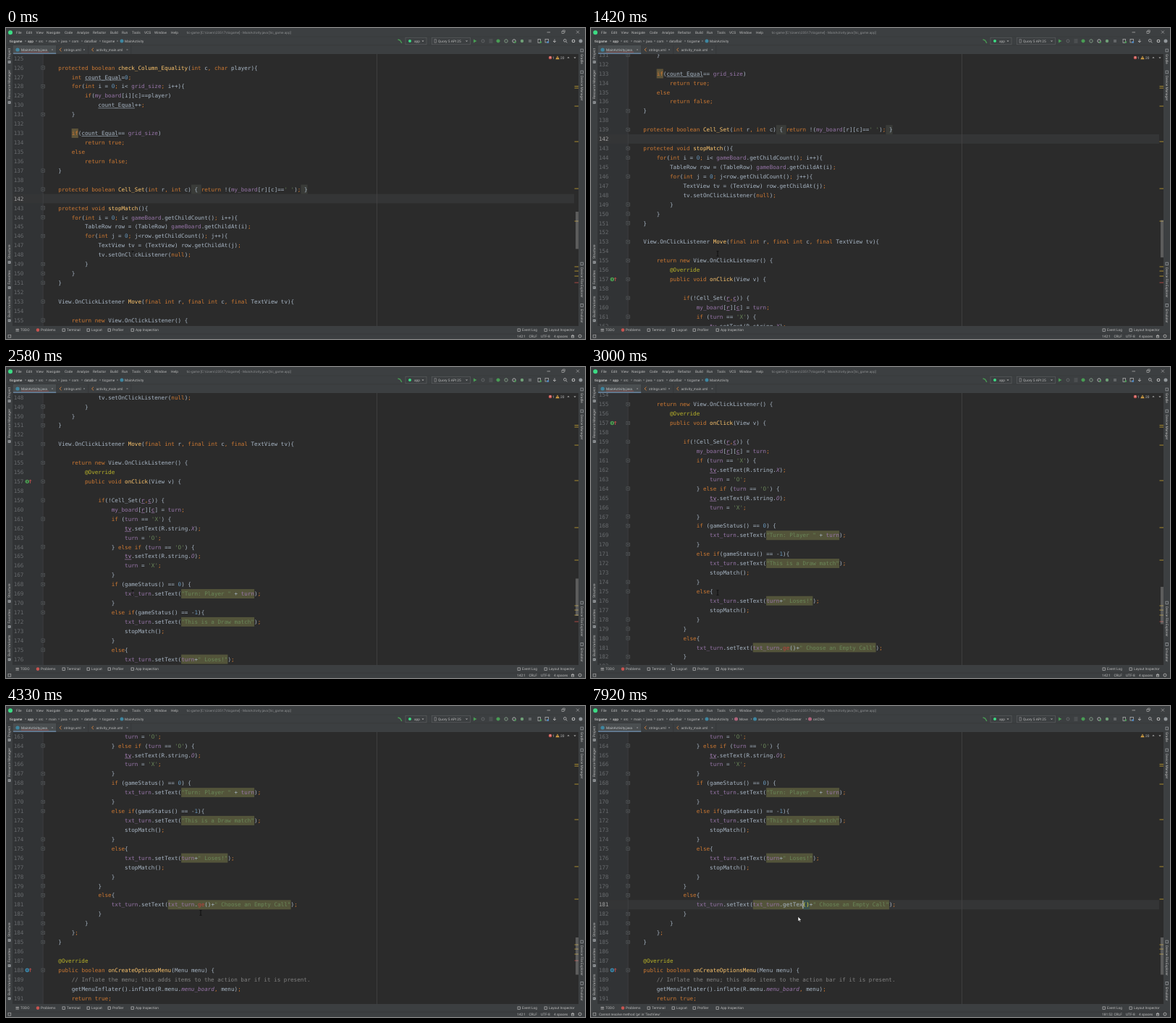
An HTML page with a canvas that plays this animation: 800 px wide and 430 px high, repeating every 8000 ms.

```html
<!DOCTYPE html>
<html lang="en">
<head>
<meta charset="utf-8">
<title>Code editor</title>
<style>
html, body { margin: 0; width: 100%; height: 100%; overflow: hidden; background: #2b2b2b; }
canvas { display: block; }
</style>
</head>
<body>
<canvas id="stage" width="800" height="430"></canvas>
<script>
const ctx = document.getElementById('stage').getContext('2d');
ctx.textRendering = 'geometricPrecision';

const LOOP = 8000, STEP = 1000 / 12;
const CODE_X = 72.3, CHAR = 4.59, ROW = 12.93, FIRST_Y = 42;
const MONO = '7.62px "DejaVu Sans Mono", monospace';
const UI = '4.8px Roboto, sans-serif';
const PANEL = '#3c3f41', INK = '#bbbbbb', DIM = '#8c8e90', GREEN = '#499c54';
const ORANGE = '#cc7832', PURPLE = '#9876aa', PLAIN = '#a9b7c6', YELLOW = '#c4a33a', BLUE = '#4a88c7', RED = '#c75450';

const CLICK = 4830, ANALYSED = 7170;
const KEYS = [[6580, 't'], [7670, 'T'], [7750, 'e'], [7910, 'x']];
const SCROLL = [[833, 0], [1417, 82.5], [2083, 185], [2583, 271.5], [3333, 417], [3583, 426.7], [3667, 426.7], [4000, 465.5]];
const MOUSE_X = [[3900, 175], [4330, 269], [4420, 269], [4667, 275], [4920, 275], [5500, 286]];
const MOUSE_Y = [[3900, 312], [4330, 286], [4420, 286], [4667, 280], [4920, 280], [5500, 291]];

const SOURCE = `
protected boolean check_Column_Equality(int c, char player){
    int count_Equal=0;
    for(int i = 0; i< grid_size; i++){
        if(my_board[i][c]==player)
            count_Equal++;
    }

    if(count_Equal== grid_size)
        return true;
    else
        return false;
}

protected boolean Cell_Set(int r, int c) { return !(my_board[r][c]==' '); }

protected void stopMatch(){
    for(int i = 0; i< gameBoard.getChildCount(); i++){
        TableRow row = (TableRow) gameBoard.getChildAt(i);
        for(int j = 0; j<row.getChildCount(); j++){
            TextView tv = (TextView) row.getChildAt(j);
            tv.setOnClickListener(null);
        }
    }
}

View.OnClickListener Move(final int r, final int c, final TextView tv){

    return new View.OnClickListener() {
        @Override
        public void onClick(View v) {

            if(!Cell_Set(r,c)) {
                my_board[r][c] = turn;
                if (turn == 'X') {
                    tv.setText(R.string.X);
                    turn = 'O';
                } else if (turn == 'O') {
                    tv.setText(R.string.O);
                    turn = 'X';
                }
                if (gameStatus() == 0) {
                    txt_turn.setText("Turn: Player " + turn);
                }
                else if(gameStatus() == -1){
                    txt_turn.setText("This is a Draw match");
                    stopMatch();
                }
                else{
                    txt_turn.setText(turn+" Loses!");
                    stopMatch();
                }
            }
            else{
                txt_turn.setText(txt_turn.ge()+" Choose an Empty Call");
            }
        }
    };
}

@Override
public boolean onCreateOptionsMenu(Menu menu) {
    // Inflate the menu; this adds items to the action bar if it is present.
    getMenuInflater().inflate(R.menu.menu_board, menu);
    return true;`.split('\n');

const TOKEN = /\/\/.*|"[^"]*"|'[^']*'|@?\w+|\s+|[^\w\s]/g;
const KEYWORD = /^(protected|public|final|boolean|int|char|void|for|if|else|return|true|false|null|new)$/;
const FIELD = /^(my_board|gameBoard|turn|grid_size|txt_turn)$/;

// The folded body hides two line numbers.
const lineNumber = row => row < 15 ? 125 + row : 127 + row;
const column = n => CODE_X + n * CHAR;

function track(keys, t) {
  if (t <= keys[0][0]) return keys[0][1];
  for (let i = 1; i < keys.length; i++) {
    const [a, from] = keys[i - 1], [b, to] = keys[i];
    if (t <= b) return from + (to - from) * (t - a) / (b - a);
  }
  return keys[keys.length - 1][1];
}

function box(x, y, w, h, color) {
  ctx.fillStyle = color;
  ctx.fillRect(x, y, w, h);
}
function frame(x, y, w, h, color, width = 0.7) {
  ctx.strokeStyle = color;
  ctx.lineWidth = width;
  ctx.strokeRect(x, y, w, h);
}
function dot(x, y, r, color) {
  ctx.fillStyle = color;
  ctx.beginPath();
  ctx.arc(x, y, r, 0, 7);
  ctx.fill();
}
function ring(x, y, r, color, width = 0.8) {
  ctx.strokeStyle = color;
  ctx.lineWidth = width;
  ctx.beginPath();
  ctx.arc(x, y, r, 0, 7);
  ctx.stroke();
}
function path(points, stroke, width = 0.8, fill) {
  ctx.beginPath();
  points.forEach(([x, y], i) => i ? ctx.lineTo(x, y) : ctx.moveTo(x, y));
  if (fill) { ctx.closePath(); ctx.fillStyle = fill; ctx.fill(); }
  if (stroke) { ctx.strokeStyle = stroke; ctx.lineWidth = width; ctx.stroke(); }
}
function label(text, x, y, color = INK, font = UI) {
  ctx.font = font;
  ctx.fillStyle = color;
  ctx.fillText(text, x, y + 1.7);
}
function sideLabel(text, x, y, angle) {
  ctx.save();
  ctx.translate(x, y);
  ctx.rotate(angle);
  label(text, 0, 0);
  ctx.restore();
}
function chevron(x, y, dx, dy, color = DIM) {
  path([[x - dx - dy, y - dy - dx], [x + dx, y + dy], [x - dx + dy, y - dy + dx]], color, 0.7);
}
function cross(x, y, r, color) {
  path([[x - r, y - r], [x + r, y + r]], color, 0.6);
  path([[x + r, y - r], [x - r, y + r]], color, 0.6);
}
const play = (x, y, color) => path([[x - 2, y - 2.5], [x + 2.5, y], [x - 2, y + 2.5]], null, 0, color);

function tokenStyle(tok, line, start, number, state) {
  const before = line.slice(0, start), next = line[start + tok.length];
  if (tok.startsWith('//')) return { color: '#808080' };
  if (/^["']/.test(tok)) return { color: '#6a8759' };
  if (tok[0] === '@') return { color: '#bbb529' };
  if (KEYWORD.test(tok) || /^[,;]$/.test(tok)) return { color: ORANGE };
  if (/^\d/.test(tok)) return { color: '#6897bb' };
  if (/R\.(string|menu)\.$/.test(before)) return { color: PURPLE, italic: true };
  if (FIELD.test(tok)) return { color: PURPLE };
  if (number > 158 && /^(r|c|tv)$/.test(tok)) return { color: '#b389c5', underline: true };
  if (tok === 'count_Equal') return { color: PLAIN, underline: true };
  if (number === 181 && tok.startsWith('ge') && !state.resolved) return { color: '#bc3f3c' };
  if (/^\s*(protected|public|View)/.test(line) && /^\w/.test(tok) && next === '(') return { color: '#ffc66d' };
  return { color: PLAIN };
}

function drawBackdrops(line, number, y, state) {
  const mark = (from, to, color) => box(column(from), y - 6.4, (to - from) * CHAR, ROW, color);
  const arg = line.match(/setText\((.*"[^"]*".*)\);/);
  if (arg) {
    const from = line.indexOf('setText(') + 8;
    mark(from, from + arg[1].length, '#53543a');
  }
  if (number === 133) mark(4, 6, '#5f5439');
  if (number === 139) {
    mark(40, 43, '#3a3c39');
    mark(73, 75, '#3a3c39');
  }
  if (number === 181 && state.clicked) mark(state.caret, state.caret + 2, '#3b514d');
}

function drawGutter(line, number, y, current) {
  label(number, 10.7, y + 1, number === current ? '#a4a3a3' : '#686b6e', MONO);
  if (/\{\s*$|^\s*\}|\}$/.test(line)) {
    box(48.7, y - 2.4, 5, 5, '#2f3133');
    frame(48.9, y - 2.2, 4.4, 4.4, '#5d6062', 0.6);
    box(50, y - 0.3, 2.2, 0.6, '#777a7c');
  }
  if (number === 157 || number === 188) {
    dot(29.3, y, 2.7, number === 157 ? '#4b9a52' : '#3f8fb5');
    if (number === 157) box(28.9, y - 1.5, 0.9, 3, '#26382a');
    else ring(29.3, y, 1.1, '#20353f');
    path([[33.6, y + 2.5], [33.6, y - 2.2]], RED, 0.9);
    path([[32.2, y - 0.7], [33.6, y - 2.5], [35, y - 0.7]], RED, 0.8);
  }
}

function drawLine(line, number, y, state) {
  drawBackdrops(line, number, y, state);
  for (const match of line.matchAll(TOKEN)) {
    const tok = match[0], start = match.index;
    if (!tok.trim()) continue;
    const style = tokenStyle(tok, line, start, number, state);
    const brace = number === 181 && state.clicked && (start === state.caret || start === state.caret + 1);
    label(tok, column(start), y + 1, brace ? '#e8dc3a' : style.color, (style.italic ? 'italic ' : '') + MONO);
    if (style.underline) box(column(start), y + 3.9, tok.length * CHAR, 0.6, style.color);
  }
  if (number === 181 && state.caretOn) box(column(state.caret) - 0.2, y - 5.6, 1, 11, '#d0d0d0');
}

function drawEditor(state) {
  ctx.save();
  ctx.beginPath();
  ctx.rect(9, 36, 782, 376);
  ctx.clip();
  box(9, 36, 782, 376, '#2b2b2b');
  box(9, 36, 42, 376, '#313335');
  const current = state.clicked ? 181 : 142;
  const rowY = row => FIRST_Y + row * ROW - state.scroll;
  box(9, rowY(current - 127) - 6.5, 776, ROW, '#343536');
  box(512, 36, 0.8, 376, '#454545');
  box(50.8, 36, 0.6, 376, '#46494b');
  SOURCE.forEach((text, row) => {
    const y = rowY(row), number = lineNumber(row);
    if (y < 25 || y > 423) return;
    const line = number === 181 ? text.replace('.ge(', `.${state.word}(`) : text;
    drawGutter(line, number, y, current);
    drawLine(line, number, y, state);
  });
  for (const y of [80.5, 83, 108, 157, 222, 267, 330, 336, 343]) box(785.5, y - 0.5, 5.5, 1.1, '#9d8430');
  if (!state.resolved) box(785.5, 351.5, 5.5, 1.1, '#9e4743');
  box(787, 254 + state.scroll * 0.1418, 4, 51.5, 'rgba(166,166,166,.4)');
  ctx.restore();

  if (!state.resolved) {
    dot(752, 41, 2.3, RED);
    box(751.6, 39.6, 0.8, 1.8, '#fff');
    label('1', 755, 41);
  }
  path([[762, 38.5], [764.7, 43.2], [759.3, 43.2]], null, 0, '#d9a343');
  box(761.6, 40, 0.8, 1.8, '#333');
  label('20', 766, 41);
  chevron(777, 41, 0, -1, INK);
  chevron(786, 41, 0, 1, INK);
}

function drawTitleBar() {
  dot(6, 6.3, 3, '#3ddc84');
  const menu = [['File', 14], ['Edit', 28], ['View', 41.5], ['Navigate', 56], ['Code', 81], ['Analyze', 98], ['Refactor', 120],
    ['Build', 144], ['Run', 160], ['Tools', 174], ['VCS', 191], ['Window', 205], ['Help', 228]];
  for (const [name, x] of menu) label(name, x, 6);
  label('tic-game [C:\\Users\\23517\\ticgame] - MainActivity.java [tic_game.app]', 249.5, 6, DIM, '4.7px Roboto, sans-serif');
  box(747.5, 5.6, 4.5, 0.7, INK);
  frame(768, 4.3, 3, 3, INK, 0.6);
  path([[769.3, 4.2], [769.3, 3], [772.3, 3], [772.3, 6], [771, 6]], INK, 0.5);
  cross(790, 5.6, 2, INK);
}

function drawNavBar(state) {
  const y = 18;
  const bold = 'bold 4.8px Roboto, sans-serif';
  label('ticgame', 5, y, INK, bold);
  label('app', 30, y, INK, bold);
  const crumbs = [['src', 45], ['main', 59], ['java', 76], ['com', 91], ['dataflair', 108], ['ticgame', 133]];
  for (const [name, x] of crumbs) label(name, x, y);
  for (const x of [27, 42, 56, 73, 88, 105, 130, 154]) chevron(x, y, 0.7, 0);
  dot(160, y, 2.5, '#3e86a0');
  label('MainActivity', 164, y);
  if (state.clicked) {
    const scope = [['Move', 205, '#b0647c'], ['anonymous OnClickListener', 231, '#3e86a0'], ['onClick', 307, '#b0647c']];
    for (const [name, x, color] of scope) {
      chevron(x - 9.5, y, 0.7, 0);
      dot(x - 4.5, y, 2.5, color);
      label(name, x, y);
    }
  }
  path([[541.5, 15.8], [544.5, 17], [546.8, 20.8]], GREEN, 1.4);
  frame(552, 13.2, 29, 9.6, '#5e6163', 0.6);
  dot(558, y, 2, '#3ddc84');
  label('app', 564, y);
  chevron(576, y, 0, 0.9, INK);
  frame(588.5, 13.2, 53, 9.6, '#5e6163', 0.6);
  frame(592, 15.8, 2.6, 4.4, DIM, 0.7);
  label('Quory 5 API 25', 597, y);
  chevron(636.5, y, 0, 0.9, INK);
  play(648, y, GREEN);
  ring(659, y, 2, '#626567', 1);
  for (const dy of [-2, 0, 2]) box(667.5, y + dy - 0.4, 5, 0.8, '#626567');
  dot(680, y, 2.4, GREEN);
  box(677, y - 0.3, 6, 0.6, GREEN);
  ring(691, y, 2.2, '#7f9a83', 1);
  ring(702, y, 2.2, INK, 0.9);
  dot(703.5, 19.5, 1.3, GREEN);
  dot(713, y, 2.2, '#6f9f77');
  box(722, 16, 4, 4, '#626567');
  frame(735, 15.6, 3.4, 4.8, INK);
  dot(738.8, 19.6, 1.3, GREEN);
  frame(745, 15.6, 4.4, 4.4, INK);
  dot(748.7, 19.6, 1.4, BLUE);
  path([[758, 15.5], [758, 19.5], [756, 18], [758, 19.7], [760, 18]], INK);
  ring(772.3, 17.3, 1.8, INK);
  path([[773.6, 18.6], [775.3, 20.4]], INK, 0.9);
  ring(784, y, 1.8, INK, 1.1);
  dot(794, y, 2.5, '#92979b');
}

function drawTabs(state) {
  box(10, 24, 59.5, 12, '#4a4e50');
  box(10, 34.4, 59.5, 1.6, '#66809a');
  dot(16, 30, 2.6, '#3e86a0');
  label('MainActivity.java', 21, 30, '#c5c7c9');
  if (!state.resolved) {
    const wave = Array.from({ length: 39 }, (_, i) => [21 + i, 32.9 + (i % 2) * 0.7]);
    path(wave, RED, 0.5);
  }
  for (const [name, x, close] of [['strings.xml', 80, 108], ['activity_main.xml', 124.5, 167.5]]) {
    path([[x - 3.5, 27.7], [x - 6, 30], [x - 3.5, 32.3]], '#c77b3b', 1);
    label(name, x, 30);
    cross(close, 30, 1, DIM);
  }
  cross(64, 30, 1, DIM);
  for (const x of [69.5, 113.5, 172.5]) box(x, 24, 0.6, 12, '#333537');
}

function drawSides() {
  const up = -Math.PI / 2, down = Math.PI / 2;
  for (const [name, y, iconY] of [['Project', 43, 47], ['Resource Manager', 98, 103], ['Structure', 319, 324],
    ['Favorites', 354.5, 359], ['Build Variants', 400, 404.5]]) {
    sideLabel(name, 4.6, y, up);
    box(2.7, iconY - 1.8, 3.8, 3.6, '#a0a4a7');
    box(3.7, iconY - 0.7, 1.2, 1.2, PANEL);
  }
  for (const [name, y, iconY] of [['Gradle', 36, 31], ['Device Manager', 66, 61], ['Device File Explorer', 331, 326], ['Emulator', 388.5, 383.5]]) {
    sideLabel(name, 795.6, y, down);
    frame(794, iconY - 1.9, 3.4, 3.8, '#a0a4a7');
  }
}

function drawBottom(state) {
  const y = 417.6;
  for (const [name, x] of [['TODO', 20], ['Problems', 48], ['Terminal', 84], ['Logcat', 118], ['Profiler', 147],
    ['App Inspection', 179], ['Event Log', 713], ['Layout Inspector', 750]]) {
    label(name, x, y);
    if (name === 'Problems') dot(x - 4, y, 2.3, RED);
    else if (name === 'TODO') for (const dy of [-1.5, 0, 1.5]) box(x - 6.5, y + dy - 0.3, 4.4, 0.7, INK);
    else frame(x - 6, y - 1.7, 3.6, 3.4, INK);
  }
  box(0, 422.8, 800, 0.5, '#323436');
  frame(3, 424.2, 3.8, 3.8, INK, 0.6);
  if (state.message) label("Cannot resolve method 'ge' in 'TextView'", 11, 426);
  label(state.position, 706, 426);
  label('CRLF', 722.5, 426);
  label('UTF-8', 739, 426);
  label('4 spaces', 757, 426);
  frame(781.3, 425.5, 3.4, 2.5, INK);
  ring(783, 425.2, 1.1, INK, 0.6);
  ring(793, 426, 2, INK);
}

function drawMouse(x, y, arrow) {
  if (arrow) {
    path([[x, y], [x, y + 7], [x + 1.6, y + 5.5], [x + 2.8, y + 8], [x + 3.9, y + 7.5], [x + 2.8, y + 5.1], [x + 4.9, y + 5], [x, y]],
      '#111', 0.6, '#f4f4f4');
    return;
  }
  path([[x, y - 3.4], [x, y + 3.4]], '#0c0c0c', 0.9);
  for (const dy of [-3.4, 3.4]) path([[x - 1.6, y + dy], [x + 1.6, y + dy]], '#0c0c0c', 0.7);
}

function stateAt(t) {
  const typed = KEYS.filter(([at]) => t >= at).map(([, key]) => key).join('');
  const word = 'ge' + typed;
  const clicked = t >= CLICK;
  const lastWake = [CLICK, 6000, ...KEYS.map(([at]) => at)].filter(at => t >= at).pop();
  return {
    word, clicked,
    caret: 42 + word.length,
    caretOn: clicked && t - lastWake < 560,
    resolved: t >= ANALYSED,
    message: t >= 5490,
    // The position readout trails the last key.
    position: clicked ? `181:${Math.min(47 + word.length, 52)}` : '142:1',
    scroll: track(SCROLL, t)
  };
}

function draw(t) {
  const state = stateAt(t);
  box(0, 0, 800, 430, PANEL);
  box(0, 11.8, 800, 0.5, '#36393b');
  box(0, 23.6, 800, 0.5, '#323436');
  drawTitleBar();
  drawNavBar(state);
  drawTabs(state);
  drawEditor(state);
  drawSides();
  drawBottom(state);
  drawMouse(track(MOUSE_X, t), track(MOUSE_Y, t), t >= 5080);
}

const begin = performance.now();
function tick() {
  const t = (performance.now() - begin) % LOOP;
  draw(Math.floor((t + 5) / STEP) * STEP);
  requestAnimationFrame(tick);
}
tick();
</script>
</body>
</html>
```
